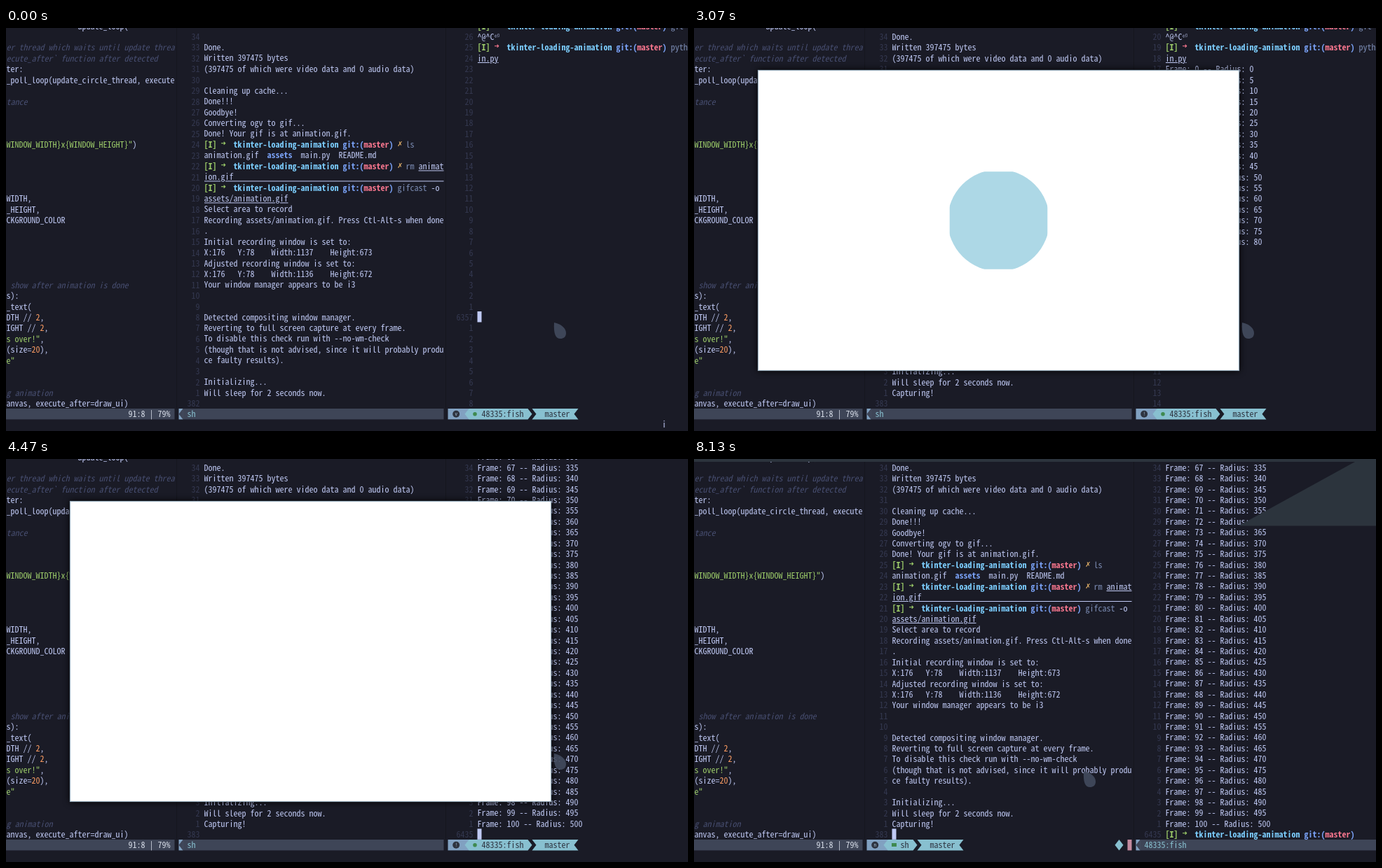
An HTML page that plays this animation: 973 by 576 pixels, repeating every 8190 ms.

```html
<!DOCTYPE html>
<html lang="en">
<head>
<meta charset="utf-8">
<title>Terminal loading animation</title>
<style>
  html, body { margin: 0; width: 100%; height: 100%; overflow: hidden; background: #1a1b26; }
  body {
    position: relative; color: #c0caf5;
    font: 12px/15.425px "Noto Sans Mono CJK JP", "Noto Sans Mono CJK SC", "Noto Sans Mono", monospace;
    letter-spacing: calc(6px - 1ch); font-variant-ligatures: none;
  }
  .pane { position: absolute; top: 0; height: 544px; overflow: hidden; }
  .line { position: absolute; left: 0; white-space: pre; height: 15.425px; }
  .nums .line { left: auto; right: 0; color: #343850; }
  .strip { position: absolute; left: 0; top: 0; }
  svg { position: absolute; left: 0; top: 0; }
  svg text { white-space: pre; }
  .cell { display: inline-block; width: 6px; height: 15px; vertical-align: top; letter-spacing: 0; font-family: "DejaVu Sans Mono", monospace; }
  .note { color: #474e70; font-style: italic; }
  .green { color: #9ece6a; }
  .orange { color: #ff9e64; }
  .yellow { color: #e0af68; }
  .red { color: #f7768e; }
  .blue { color: #7aa2f7; }
  .cyan { color: #7dcfff; }
  .cmd { color: #7c8db5; }
  .bold { font-weight: bold; }
  .path { text-decoration: underline; text-underline-offset: 1px; }
</style>
</head>
<body>
<div class="pane" id="code" style="left:.5px;width:240px"></div>
<div class="pane nums" id="logNums" style="left:246.5px;width:30px"></div>
<div class="pane" id="log" style="left:282.5px;width:342px"></div>
<div class="pane nums" id="shellNums" style="left:630.5px;width:36px"></div>
<div class="pane" id="shell" style="left:672.5px;width:301px"></div>
<svg id="stage" width="973" height="576" viewBox="0 0 973 576"></svg>

<script>
const LOOP = 8190, TICK = 1000 / 15, ROW = 15.425, TOP = 4, SCALE = .856;
const LOG_X = 282.5, SHELL_X = 672.5, FIRST_LINE = 6330;
const $ = id => document.getElementById(id);
const rowY = row => TOP + row * ROW;
const tag = (cls, text) => `<span class="${cls}">${text}</span>`;
const clamp = v => Math.max(0, Math.min(1, v));

function addLine(parent, row, html = '') {
  const el = document.createElement('div');
  el.className = 'line';
  el.style.top = rowY(row) + 'px';
  el.innerHTML = html;
  parent.append(el);
  return el;
}

function addStrip(pane) {
  const el = document.createElement('div');
  el.className = 'strip';
  pane.append(el);
  return el;
}

const prompt = (arrow = 'green') =>
  tag('green bold', '[I]') + ' ' + tag(`${arrow} bold cell`, '➜') + '  ' +
  tag('cyan bold', 'tkinter-loading-animation') + ' ' +
  tag('blue bold', 'git:(') + tag('red bold', 'master') + tag('blue bold', ')') + ' ';
const dirty = tag('yellow cell', '✗') + ' ';

// Editor pane
const code = {
  '-1': 'update_loop('.padStart(29),
  1: tag('note', 'er thread which waits until update threa'),
  2: tag('note', 'ecute_after` function after detected'),
  3: 'ter:',
  4: '_poll_loop(update_circle_thread, execute',
  6: tag('note', 'tance'),
  10: tag('green', 'WINDOW_WIDTH}x{WINDOW_HEIGHT}"') + ')',
  15: 'WIDTH,',
  16: '_HEIGHT,',
  17: 'CKGROUND_COLOR',
  23: tag('note', ' show after animation is done'),
  24: 's):',
  25: '_text(',
  26: `DTH // ${tag('orange', 2)},`,
  27: `IGHT // ${tag('orange', 2)},`,
  28: tag('green', 's over!"') + ',',
  29: `(size=${tag('orange', 20)}),`,
  30: tag('green', 'e"'),
  33: tag('note', 'g animation'),
  34: 'anvas, execute_after=draw_ui)'
};
for (const row in code) addLine($('code'), +row, code[row]);

// Recorder log pane
const logStrip = addStrip($('log'));
[
  'Done.',
  'Written 397475 bytes',
  '(397475 of which were video data and 0 audio data)',
  '',
  'Cleaning up cache...',
  'Done!!!',
  'Goodbye!',
  'Converting ogv to gif...',
  'Done! Your gif is at animation.gif.',
  prompt() + dirty + tag('cmd', 'ls'),
  `animation.gif  ${tag('blue bold', 'assets')}  main.py  README.md`,
  prompt() + dirty + tag('cmd', 'rm') + ' ' + tag('path', 'animat'),
  tag('path', 'ion.gif'.padEnd(57)),
  prompt() + tag('cmd', 'gifcast') + ' -o',
  tag('path', 'assets/animation.gif'),
  'Select area to record',
  'Recording assets/animation.gif. Press Ctl-Alt-s when done',
  '.',
  'Initial recording window is set to:',
  'X:176   Y:78    Width:1137    Height:673',
  'Adjusted recording window is set to:',
  'X:176   Y:78    Width:1136    Height:672',
  'Your window manager appears to be i3',
  '',
  '',
  'Detected compositing window manager.',
  'Reverting to full screen capture at every frame.',
  'To disable this check run with --no-wm-check',
  '(though that is not advised, since it will probably produ',
  'ce faulty results).',
  '',
  'Initializing...',
  'Will sleep for 2 seconds now.',
  'Capturing!'
].forEach((html, row) => addLine(logStrip, row, html));
const capturing = logStrip.lastChild;

// Shell pane
const shellStrip = addStrip($('shell'));
const shellText = [
  prompt() + tag('cmd', 'git'),
  '^@^C' + tag('cell', '⏎'),
  prompt('red') + tag('cmd', 'python') + ' ma',
  tag('path', 'in.py')
];
for (let k = 0; k <= 100; k++) shellText.push(`Frame: ${k} -- Radius: ${k * 5}`);
shellText.push(prompt());
const shellLines = shellText.map((html, i) => addLine(shellStrip, i - 1, html));

const numberRows = id => Array.from({ length: 35 }, (_, row) => addLine($(id), row));
const logNums = numberRows('logNums'), shellNums = numberRows('shellNums');
const setText = (el, text) => { if (el.textContent !== text) el.textContent = text; };

// Status bars, window, cursor and pointer
const BAR = 544, BAR_H = 15.4, MID = BAR + BAR_H / 2, END = BAR + BAR_H;
const label = (x, text, fill) => `<text x="${x}" y="556" fill="${fill}">${text}</text>`;
const poly = (points, fill) => `<polygon points="${points}" fill="${fill}"/>`;
const rect = (x, w, fill) => `<rect x="${x}" y="${BAR}" width="${w}" height="${BAR_H}" fill="${fill}"/>`;

function activeBar(x, name, icon) {
  const teal = '#88c0d0', ink = '#2e3440', e = x + 48 + name.length * 6;
  return rect(x, 30, '#81a1c1') +
    poly(`${x + 30},${BAR} ${e + 6},${BAR} ${e + 12},${MID} ${e + 6},${END} ${x + 30},${END} ${x + 24},${MID}`, teal) +
    poly(`${e + 12},${BAR} ${e + 78},${BAR} ${e + 72},${MID} ${e + 78},${END} ${e + 12},${END} ${e + 18},${MID}`, teal) +
    `<circle cx="${x + 11.7}" cy="${MID}" r="5" fill="${ink}"/>` +
    `<text class="mode" x="${x + 11.7}" y="${MID + 2.6}" font-size="7" text-anchor="middle" fill="#a9c4d8" letter-spacing="0"></text>` +
    icon + label(x + 48, name, ink) + label(e + 30, 'master', ink);
}

const idleBar = (x, w, name) => rect(x, 6, '#81a1c1') + rect(x + 6, w - 6, '#3e4557') +
  poly(`${x},${MID} ${x + 6},${BAR} ${x + 6},${END}`, '#3e4557') + label(x + 12, name, '#88c0d0');

$('stage').innerHTML = `
  <path d="M243.5 0V544M627.5 0V544" stroke="#15161e"/>
  ${rect(0, 240.5, '#3e4557')}${label(174.5, '91:8 | 79%', '#d8dee9')}
  <g id="shellFocus">
    ${idleBar(246.5, 378, 'sh')}
    ${activeBar(630.5, '48335:fish', `<circle cx="669" cy="${MID}" r="2.8" fill="#3f8a50"/>`)}
  </g>
  <g id="logFocus">
    ${activeBar(246.5, 'sh', '<rect x="282" y="549" width="7" height="5" fill="#3f8a50"/>')}
    ${poly(`600.5,${MID} 606.5,${BAR} 612.5,${MID} 606.5,${END}`, '#88c0d0')}${rect(618.5, 6, '#c38a9f')}
    ${idleBar(630.5, 343, '48335:fish')}
  </g>
  <text id="key" x="936" y="571" fill="#c0caf5">i</text>
  <rect id="cursor" width="6" height="15.4" fill="#c0caf5"/>
  <g id="win" style="filter:drop-shadow(0 0 5px #000)">
    <rect x="91.5" y="60.5" width="686" height="429" fill="#fff" stroke="#9fb4c4" stroke-width="1.2"/>
    <svg x="92" y="61" width="685" height="428">
      <svg id="disc"><circle id="circle" fill="#add8e6"/></svg>
    </svg>
    <text id="over" x="434.5" y="282.5" text-anchor="middle" fill="#00f" letter-spacing="0"
      style="font:21px 'DejaVu Sans',sans-serif">It's over!</text>
  </g>
  <path id="drop" d="M0 0C10 2 17 8 17 15C17 21 13 23 9 23C2 23 -1 16 0 0Z" fill="#434b5e" opacity=".9"/>
  <path id="beam" d="M-3 -9Q0 -9 0 -7Q0 -9 3 -9M0 -7V7M-3 9Q0 9 0 7Q0 9 3 9" fill="none" stroke="#4a5060" stroke-width="1.3"/>
  <polygon id="sheet" points="0,0 973,0 973,95.5 777,95.5 943,4 0,4" fill="#2c343d"/>`;

const show = (id, on) => $(id).style.display = on ? '' : 'none';
const put = (id, attrs) => { for (const k in attrs) $(id).setAttribute(k, attrs[k]); };
const modes = document.querySelectorAll('.mode');

// Cursor jumps: [time, x, row, glides]
const jumps = [
  [0, SHELL_X, 26, false], [1400, SHELL_X + 30, 2, true], [2600, SHELL_X, 3, false],
  [6330, SHELL_X + 270, 34, false], [7000, LOG_X, 34, true]
];
// Pointer path: [time, x, y]
const pointer = [[0, 782, 421], [5270, 782, 421], [5670, 700, 365], [6400, 707, 374], [7065, 556, 446], [LOOP, 556, 446]];

function pointerAt(t) {
  const i = Math.max(1, pointer.findIndex(p => p[0] > t));
  const [t0, x0, y0] = pointer[i - 1], [t1, x1, y1] = pointer[i];
  const u = clamp((t - t0) / (t1 - t0)), s = u * u * (3 - 2 * u);
  return [x0 + (x1 - x0) * s, y0 + (y1 - y0) * s];
}

function drawShell(t, n) {
  const current = t < 1395 ? 27 : t < 2595 ? 3 : n + 5;
  const scroll = Math.max(0, current - 35);
  shellStrip.style.transform = `translateY(${-scroll * ROW}px)`;
  shellLines.forEach((el, i) => {
    el.style.display = i < Math.max(4, n + 5) || (i === 105 && t >= 6325) ? '' : 'none';
  });
  shellNums.forEach((el, row) => {
    const gap = Math.abs(row + 1 + scroll - current);
    setText(el, String(gap || FIRST_LINE + current));
  });
}

function drawLog(t) {
  const done = t >= 330;
  logStrip.style.transform = done ? '' : `translateY(${ROW}px)`;
  capturing.style.display = done ? '' : 'none';
  logNums.forEach((el, row) => setText(el, String(34 - row || (done ? 383 : 382))));
}

function drawCursor(t, n) {
  const i = jumps.findLastIndex(j => t >= j[0] - 5);
  const [start, x, firstRow, glides] = jumps[i];
  const row = start === 2600 ? Math.min(34, n + 4) : firstRow;
  const [, fromX, fromRow] = jumps[Math.max(0, i - 1)];
  const left = glides ? (1 - clamp((t - start + 5) / 133)) ** 2 : 0;
  put('cursor', { x: x + (fromX - x) * left, y: rowY(row + (fromRow - row) * left) });
}

function drawWindow(t, n) {
  show('win', t >= 2725 && t < 6195);
  $('win').style.opacity = clamp((t - 2665) / 133);
  show('disc', n >= 0 && t < 4395);
  show('over', t >= 4725);
  const radius = Math.max(0, n) * 5, half = radius * SCALE + 1.3;
  put('disc', { x: 342.5 - half, y: 214 - half, width: half * 2, height: half * 2 });
  put('circle', { cx: half, cy: half, r: (radius + 5) * SCALE });
}

function drawPointer(t) {
  const [x, y] = pointerAt(t);
  const beam = t >= 6195 && t < 6395;
  show('beam', beam);
  show('drop', !beam);
  put('beam', { transform: 'translate(707 374)' });
  put('drop', { transform: `translate(${x} ${y})` });
}

function draw(time) {
  const t = Math.floor((time % LOOP + 5) / TICK) * TICK;
  const n = t < 2820 ? -1 : Math.min(100, Math.round(47 + (t - 3533.3) / 15.09));
  drawLog(t);
  drawShell(t, n);
  drawCursor(t, n);
  drawWindow(t, n);
  drawPointer(t);
  const logFocus = t >= 6995;
  show('logFocus', logFocus);
  show('shellFocus', !logFocus);
  show('key', t < 195);
  show('sheet', t >= 8125);
  modes.forEach(el => setText(el, t < 195 ? 'v' : t < 1395 || logFocus ? 'n' : '!'));
}

const begin = performance.now();
function loop() {
  draw(performance.now() - begin);
  requestAnimationFrame(loop);
}
loop();
</script>
</body>
</html>
```
